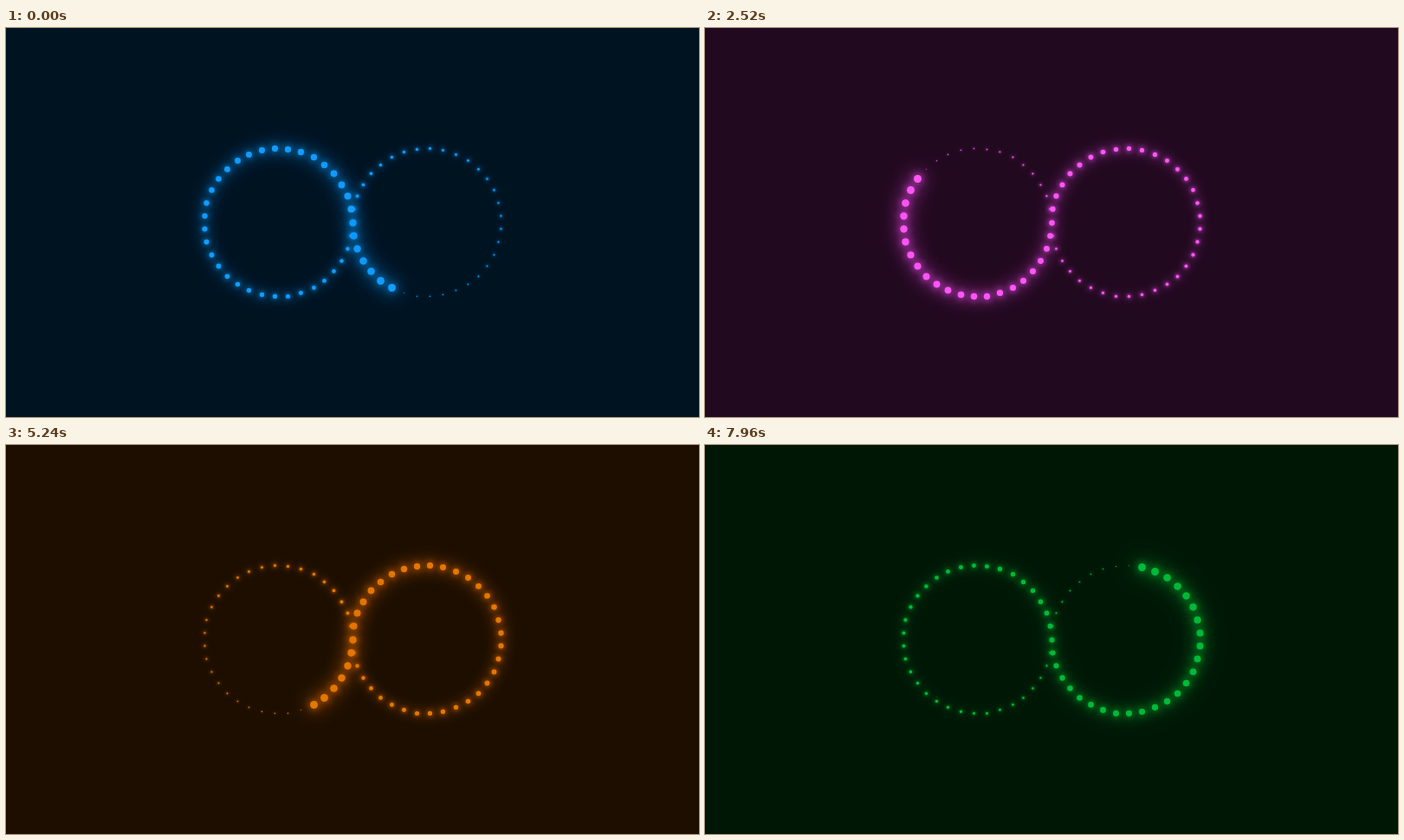
Animation, 800 px wide and 450 px high, one loop 8000 ms. Source, as an HTML page:

```html
<!DOCTYPE html>
<html lang="en">
<head>
<meta charset="utf-8">
<title>Infinity loader</title>
<style>
  html, body { margin: 0; width: 100%; height: 100%; overflow: hidden; background: #001321; }
  #stage {
    position: relative;
    width: 800px;
    height: 450px;
    overflow: hidden;
    background: #001321;
  }
  #stage i {
    position: absolute;
    width: 8.8px;
    height: 8.8px;
    margin: -4.4px;
    border-radius: 50%;
    color: #149cff;
    background: currentColor;
    box-shadow: 0 0 10px, 0 0 20px, 0 0 40px;
  }
</style>
</head>
<body>
<div id="stage"></div>
<script>
  const LOOP = 8000;          // ms before the hard restart
  const HUE_PERIOD = 10000;   // ms per full hue turn
  const STEP = 50;            // ms between neighbouring dots
  const PER_RING = 35;
  const COUNT = PER_RING * 2;
  const START = 6.4;          // head position at time zero, in dots
  const RADIUS = 85.7;
  const CENTER = { x: 400, y: 225 };
  const MIN_SCALE = 0.1;

  const stage = document.getElementById('stage');

  // The path leaves the centre downwards, first around the right ring, then the left.
  const dots = Array.from({ length: COUNT }, (_, i) => {
    const side = i < PER_RING ? 1 : -1;
    const angle = (i % PER_RING) / PER_RING * 2 * Math.PI;
    const dot = document.createElement('i');
    dot.style.left = CENTER.x + side * RADIUS * (1 - Math.cos(angle)) + 'px';
    dot.style.top = CENTER.y + RADIUS * Math.sin(angle) + 'px';
    stage.append(dot);
    return dot;
  });

  function draw(time) {
    const t = time % LOOP;
    const head = START + t / STEP;
    dots.forEach((dot, i) => {
      const age = (head - i + COUNT) % COUNT / COUNT;
      dot.style.transform = `scale(${1 - (1 - MIN_SCALE) * age})`;
    });
    stage.style.filter = `hue-rotate(${t / HUE_PERIOD * 360}deg)`;
  }

  function tick(now) {
    draw(now);
    requestAnimationFrame(tick);
  }

  draw(0);
  requestAnimationFrame(tick);
</script>
</body>
</html>
```
